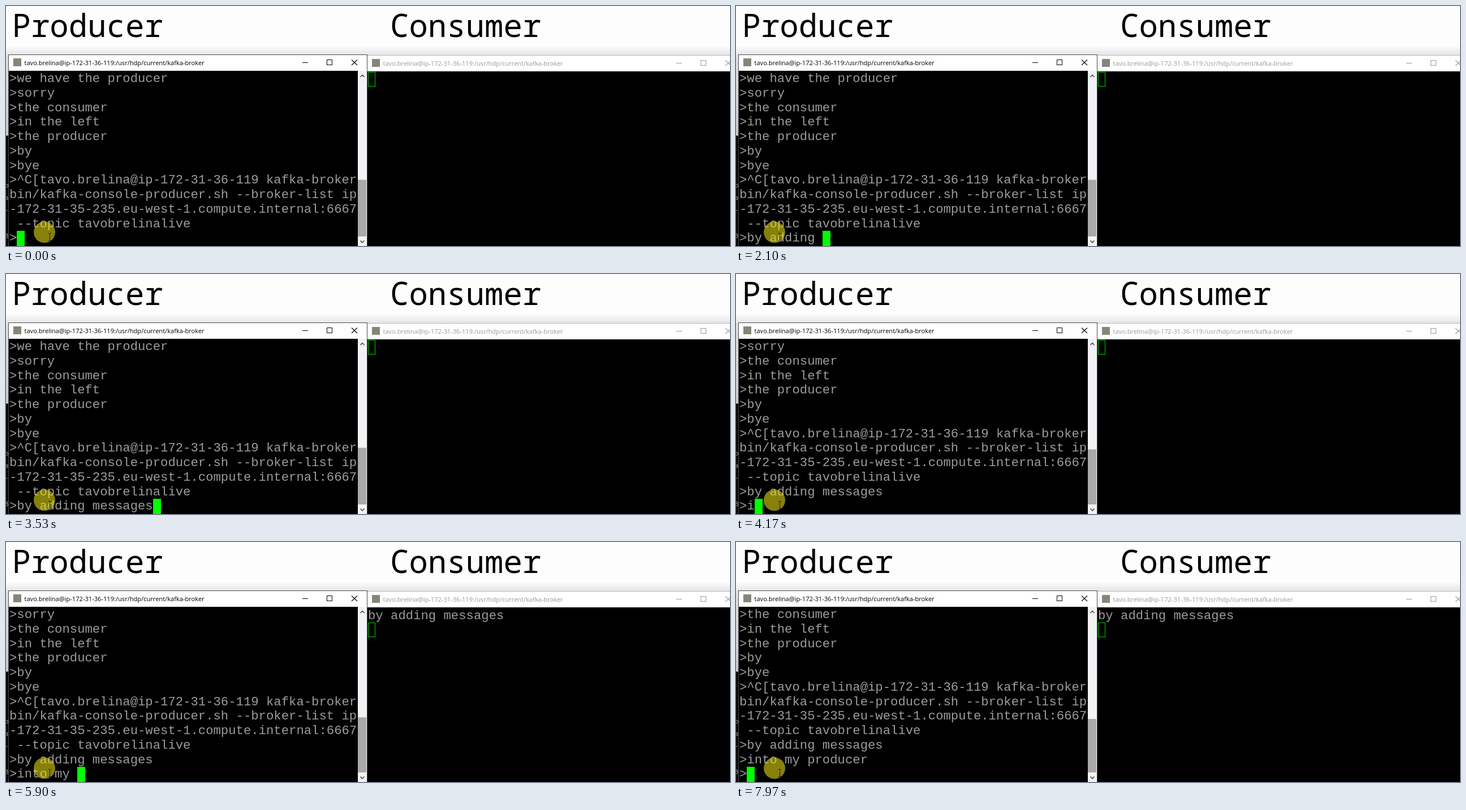
An HTML page with a canvas that plays this animation: 1280 px wide and 426 px high, repeating every 8000 ms.

```html
<!DOCTYPE html>
<html lang="en">
<head>
<meta charset="utf-8">
<title>Producer and consumer</title>
<style>
  html, body { margin: 0; width: 100%; height: 100%; overflow: hidden; background: #fdfdfd; }
  canvas { display: block; }
</style>
</head>
<body>
<canvas id="stage" width="1280" height="426"></canvas>
<script>
const ctx = document.getElementById('stage').getContext('2d');
const LOOP = 8000, CELL = 13.35, ROW = 25.73, ROWS = 12;
const TERMINAL = '22.25px "Liberation Mono", monospace';
const HEADING = '55.7px "Noto Sans Mono", monospace';
const CAPTION = '11.1px "Open Sans", sans-serif';
const GREEN = '#00ff00', GRAY = '#9c9c9c';

const user = 'tavo.brelina';
const caption = `${user}@ip-172-31-36-119:/usr/hdp/current/kafka-broker`;
const history = [
  '>we have the producer', '>sorry', '>the consumer', '>in the left',
  '>the producer', '>by', '>bye',
  `>^C[${user}@ip-172-31-36-119 kafka-broker`,
  'bin/kafka-console-producer.sh --broker-list ip',
  '-172-31-35-235.eu-west-1.compute.internal:6667',
  ' --topic tavobrelinalive'
];

// One key press time per character of the message
const message = 'by adding messages\ninto my producer\n';
const keyTimes = [
  100, 470, 670, 870, 1270, 1400, 1530, 1670, 1800, 2100,
  2500, 2570, 2630, 2700, 2770, 2830, 2900, 3300, 3700,
  4070, 4330, 4600, 4930, 5270, 5500, 5700, 5900,
  6200, 6470, 6770, 7000, 7130, 7300, 7430, 7570, 7800
];
const RECEIVED = 5500;

function rect(x, y, w, h, fill) {
  ctx.fillStyle = fill;
  ctx.fillRect(x, y, w, h);
}

function text(str, x, y, font, fill) {
  ctx.font = font;
  ctx.fillStyle = fill;
  ctx.fillText(str, x, y);
}

function line(color, width, ...points) {
  ctx.strokeStyle = color;
  ctx.lineWidth = width;
  ctx.beginPath();
  points.forEach(([x, y]) => ctx.lineTo(x, y));
  ctx.stroke();
}

function fade(x, y, w, h, from, to) {
  const g = ctx.createLinearGradient(0, y, 0, y + h);
  g.addColorStop(0, from);
  g.addColorStop(1, to);
  rect(x, y, w, h, g);
}

function titleBar(x, y, w, buttonsX, color) {
  rect(x, y, w, 29, '#fff');
  rect(x + 8, y + 6, 14, 14, '#85857a');
  text(caption, x + 27.5, y + 18, CAPTION, color);
  const mid = y + 13.5, closeX = buttonsX + 87;
  line(color, 1, [buttonsX, mid], [buttonsX + 10, mid]);
  ctx.strokeRect(buttonsX + 43.5, mid - 5, 9, 9);
  line(color, 1.1, [closeX, mid - 5], [closeX + 10, mid + 4.5]);
  line(color, 1.1, [closeX + 10, mid - 5], [closeX, mid + 4.5]);
}

function backdrop() {
  rect(0, 0, 1280, 426, '#fdfdfd');
  fade(0, 70, 1280, 17, '#fdfdfd', '#e6e6e8');
  fade(0, 87, 5, 143, '#dedee4', '#c6c6d0');
  rect(0, 230, 5, 196, '#0a0a0a');
  [['l', 275], ['o', 322], ['a', 344], ['r', 368], ['3', 412]]
    .forEach(([s, y]) => text(s, -2, y, CAPTION, '#aaa'));
  text('Producer', 10.5, 54.5, HEADING, '#000');
  text('Consumer', 679, 54.5, HEADING, '#000');
}

function scrollBar(thumbTop) {
  rect(622, 115, 16, 311, '#f2f2f5');
  rect(622, thumbTop, 15, 409 - thumbTop, '#a9a9a9');
  line('#505050', 1.6, [626.5, 126], [630, 122.5], [633.5, 126]);
  line('#505050', 1.6, [626.5, 416.5], [630, 420], [633.5, 416.5]);
}

function producer(t) {
  const typed = message.slice(0, keyTimes.filter(k => k <= t).length);
  const entries = typed.split('\n').map(s => '>' + s);
  const lines = history.concat(entries).slice(-ROWS);
  rect(4, 86, 635, 340, '#4a4a4a');
  titleBar(5, 87, 633, 524, '#000');
  rect(5, 115, 617, 311, '#000');
  lines.forEach((s, i) => text(s, 6, 135.3 + i * ROW, TERMINAL, GRAY));
  rect(Math.round(6 + lines[ROWS - 1].length * CELL), 399, 14, 27, GREEN);
  scrollBar(308.5 + (entries.length - 1) * 2.8);
}

function consumer(t) {
  const received = t >= RECEIVED;
  rect(639, 87, 641, 339, '#b8b8b8');
  titleBar(639, 88, 641, 1185, '#999');
  rect(639, 116, 641, 310, '#000');
  if (received) text('by adding messages', 640, 136.5, TERMINAL, GRAY);
  ctx.strokeStyle = '#00d000';
  ctx.lineWidth = 1;
  ctx.strokeRect(640.5, received ? 143.5 : 117.5, 12, 25);
}

function pointer() {
  ctx.fillStyle = 'rgba(238, 225, 20, 0.57)';
  ctx.beginPath();
  ctx.arc(68, 401.5, 19, 0, 2 * Math.PI);
  ctx.fill();
  ctx.globalCompositeOperation = 'difference';
  line('#666', 1, [77.5, 404], [77.5, 416]);
  line('#666', 1, [75, 403.5], [80, 403.5]);
  line('#666', 1, [75, 416.5], [80, 416.5]);
  ctx.globalCompositeOperation = 'source-over';
}

function draw(now) {
  const t = now % LOOP;
  backdrop();
  consumer(t);
  producer(t);
  pointer();
  requestAnimationFrame(draw);
}
requestAnimationFrame(draw);
</script>
</body>
</html>
```
